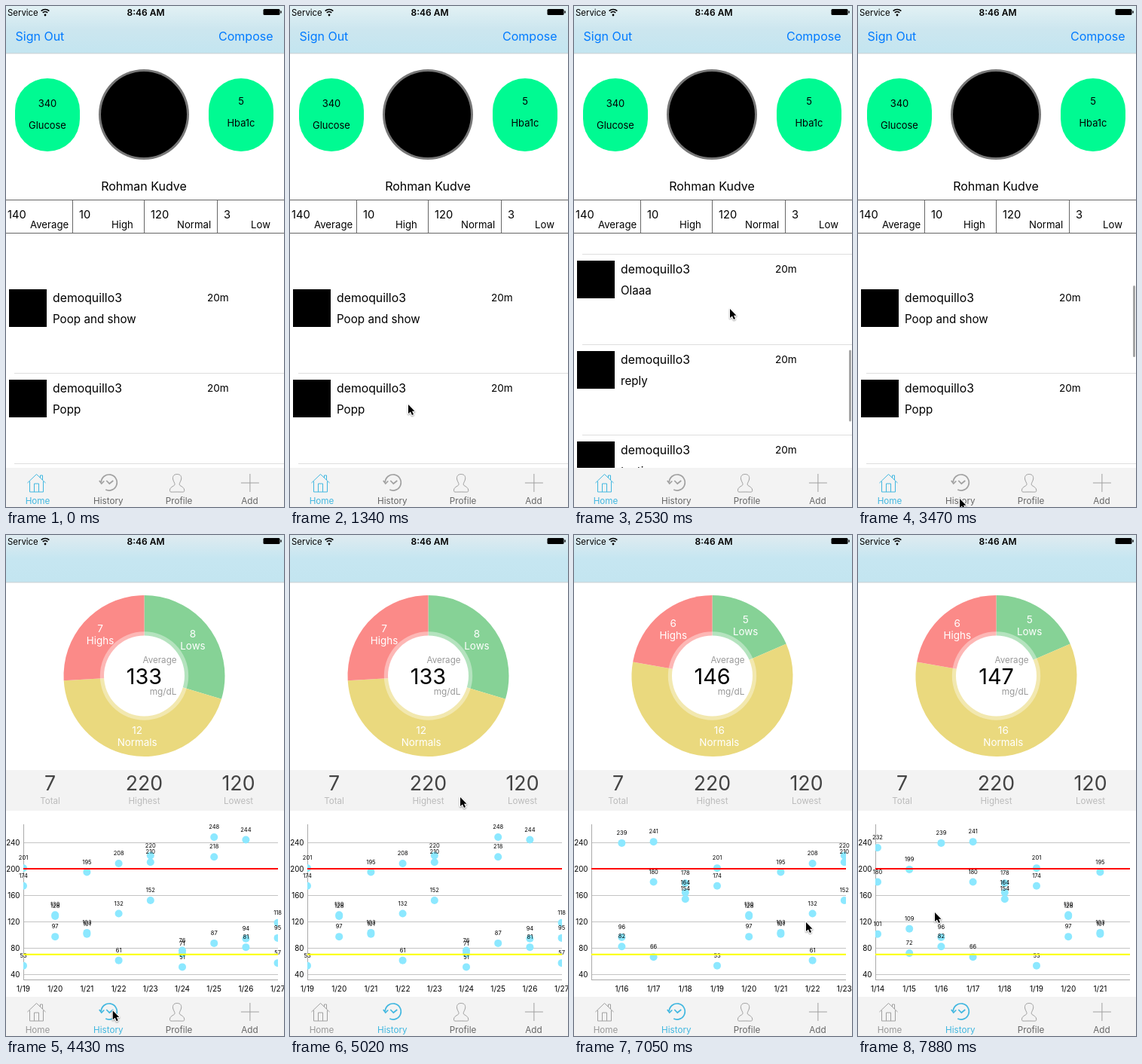
Write an HTML page with a canvas that moves like this. It is 369 px wide and 665 px high and loops after 8000 ms.

```html
<!DOCTYPE html>
<html lang="en">
<head>
<meta charset="utf-8">
<title>Glucose diary</title>
<style>
html, body { margin: 0; width: 100%; height: 100%; overflow: hidden; background: #fff; }
canvas { display: block; width: 369px; height: 665px; }
</style>
</head>
<body>
<canvas id="stage"></canvas>
<script>
const W = 369, H = 665, LOOP = 8000, TICK = 119;
const canvas = document.getElementById('stage');
const ctx = canvas.getContext('2d');
const ratio = window.devicePixelRatio || 1;
canvas.width = W * ratio;
canvas.height = H * ratio;

const BLUE = '#007aff', ACCENT = '#41b7e0', GREEN = '#00fa92', PALE = '#f3f3f3';
const POSTS = ['Poop and show', 'Popp', 'Olaaa', 'reply', 'testing', 'Hello'];

// Readings per day of January, as labelled in the chart
const FIRST_DAY = 13, TODAY = 19, DAY_WIDTH = 42.2;
const READINGS = [
  [220, 215, 70], [232, 180, 101], [199, 109, 72], [239, 96, 82], [241, 180, 66],
  [178, 164, 154], [201, 174, 53], [130, 128, 97], [195, 103, 101], [208, 132, 61],
  [220, 210, 152], [76, 71, 51], [248, 218, 87], [244, 94, 81], [118, 95, 57]
];

// Timing: progress from 0 to 1 between two times
const linear = (t, from, to) => Math.min(1, Math.max(0, (t - from) / (to - from)));
const smooth = (t, from, to) => { const f = linear(t, from, to); return f * f * (3 - 2 * f); };
const slowing = (t, from, to) => 1 - (1 - linear(t, from, to)) ** 2;

const FLICK_UP = [1333, 2047], FLICK_DOWN = [2523, 2999];
const DRAG = [6331, 7045], COAST = [7045, 7878];
const listScroll = t => 278 * (slowing(t, ...FLICK_UP) - slowing(t, ...FLICK_DOWN));
const chartScroll = t => 167 * smooth(t, ...DRAG) + 47 * slowing(t, ...COAST);

const GLIDES = [
  { from: 500, to: 1333, x: 156, y: 528 },
  { from: 1333, to: 1700, x: 168, y: 345 },
  { from: 1700, to: 2523, x: 206, y: 401 },
  { from: 2523, to: 3120, x: 134, y: 653 },
  { from: 4308, to: 5022, x: 225, y: 347 },
  { from: 5260, to: 6200, x: 123, y: 511 },
  { from: DRAG[0], to: DRAG[1], x: 307, y: 513 },
  { from: COAST[0], to: COAST[1], x: 101, y: 500 }
];

function pointerAt(t) {
  let x = 216, y = 325;
  for (const glide of GLIDES) {
    const f = smooth(t, glide.from, glide.to);
    x += (glide.x - x) * f;
    y += (glide.y - y) * f;
  }
  return [x, y];
}

// y is the middle of the capitals
function text(str, x, y, size, color = '#000', align = 'left', weight = 400) {
  ctx.font = `${weight} ${size}px Inter, sans-serif`;
  ctx.fillStyle = color;
  ctx.textAlign = align;
  ctx.fillText(str, x, y + size * 0.364);
}

function rect(x, y, w, h, color) {
  ctx.fillStyle = color;
  ctx.fillRect(x, y, w, h);
}

function pill(x, y, w, h, r, color) {
  ctx.fillStyle = color;
  ctx.beginPath();
  ctx.roundRect(x, y, w, h, r);
  ctx.fill();
}

function disc(x, y, r, color) {
  ctx.fillStyle = color;
  ctx.beginPath();
  ctx.arc(x, y, r, 0, 2 * Math.PI);
  ctx.fill();
}

function stroke(path, color, width = 1) {
  ctx.strokeStyle = color;
  ctx.lineWidth = width;
  ctx.stroke(new Path2D(path));
}

function scoped(draw) {
  ctx.save();
  draw();
  ctx.restore();
}

function clip(x, y, w, h) {
  ctx.beginPath();
  ctx.rect(x, y, w, h);
  ctx.clip();
}

function header(top, middle) {
  const fade = ctx.createLinearGradient(0, 0, 0, 62);
  [top, middle, '#c3e5f0'].forEach((color, i) => fade.addColorStop(i / 2, color));
  rect(0, 0, W, 62.5, fade);
  rect(0, 62.5, W, 0.8, '#b4c0c4');
  text('Service', 2, 8.5, 11.4);
  text('8:46 AM', 185.5, 8.5, 12, '#000', 'center', 600);
  disc(52, 12, 1.4, '#000');
  for (const r of [4.5, 7.5]) {
    ctx.beginPath();
    ctx.arc(52, 12, r, -Math.PI * 0.75, -Math.PI * 0.25);
    ctx.strokeStyle = '#000';
    ctx.lineWidth = 1.7;
    ctx.stroke();
  }
  pill(341.5, 4, 22, 8, 1.5, '#000');
  rect(364.3, 6.5, 1.4, 3, '#000');
}

const TABS = [
  ['Home', 'M0 12L12 .5L24 12M3 10V24H21V10M17 5V2H20V8M9 24V13H15V24'],
  ['History', 'M4 11A10.5 10.5 0 1 1 10 21M1.5 9L4.5 13L8 9.5M11 9L15 13L20 9'],
  ['Profile', 'M11 .5C6 .5 5 4 5.5 7S8 12 8 14S2 17 1.5 21S2 24 11 24S21 25 20.5 21S14 16 14 14S16 10 16.5 7S16 .5 11 .5Z'],
  ['Add', 'M14 0V24M2 12H26']
];

function tabBar(lit, visited) {
  rect(0, 613, W, 52, PALE);
  TABS.forEach(([label, icon], i) => {
    const x = 42 + 93.8 * i, on = lit.includes(label);
    scoped(() => {
      ctx.translate(x - 13.5, 621);
      stroke(icon, on ? ACCENT : '#a0a0a0', label === 'History' ? 1.7 : 1);
    });
    text(label, x, 656.5, 11.7, on ? ACCENT : label === visited ? '#999' : '#666', 'center');
  });
}

function badge(x, value, valueY, label) {
  pill(x - 43, 96, 86, 97, 43, GREEN);
  text(value, x, valueY, 13, '#000', 'center');
  text(label, x, valueY + 29, 12.9, '#000', 'center');
}

function postList(t) {
  const scroll = listScroll(t);
  clip(0, 302, W, 311);
  POSTS.forEach((post, i) => {
    const y = 376 + i * 120 - scroll;
    rect(4, y, 50, 50, '#000');
    text('demoquillo3', 62, y + 11, 15.8);
    text(post, 62, y + 39.5, 15.2);
    text('20m', 267, y + 11, 13.6);
    rect(11, y + 111, 358, 1, '#dedede');
  });
  if (t <= FLICK_UP[0]) return;
  ctx.globalAlpha = 1 - linear(t, 3475, 3713);
  pill(365, 371 + scroll * 0.308, 3, 95, 1.5, '#a5a5a5');
}

function home(t) {
  header('#e2f1f4', '#cce6ef');
  text('Sign Out', 12.5, 40.5, 16, BLUE);
  text('Compose', 354.5, 40.5, 16, BLUE, 'right');
  badge(55, '340', 129.5, 'Glucose');
  badge(312, '5', 126, 'Hba1c');
  disc(183, 144, 60, '#777');
  disc(183, 144, 57, '#000');
  text('Rohman Kudve', 183, 239, 16, '#000', 'center');

  stroke('M0 257.5H369M0 301.5H369M88.5 257V302M183.5 257V302M280.5 257V302', '#666');
  [['140', 2, 'Average', 32], ['10', 97, 'High', 140], ['120', 192, 'Normal', 227], ['3', 289, 'Low', 325]]
    .forEach(([value, x, label, labelX]) => {
      text(value, x, 277, 14.7);
      text(label, labelX, 290.5, 13.2);
    });
  scoped(() => postList(t));
  tabBar(t >= 4065 ? ['Home', 'History'] : ['Home']);
}

function donut(values) {
  const cx = 183.5, cy = 187, labelR = 80.4;
  const lows = values.filter(v => v < 90).length;
  const highs = values.filter(v => v > 200).length;
  const slices = [
    ['Lows', lows, '#86d296'],
    ['Normals', values.length - lows - highs, '#ead97e'],
    ['Highs', highs, '#fb8a88']
  ];
  let start = -Math.PI / 2;
  for (const [label, count, color] of slices) {
    const sweep = count / values.length * 2 * Math.PI, mid = start + sweep / 2;
    ctx.fillStyle = color;
    ctx.beginPath();
    ctx.moveTo(cx, cy);
    ctx.arc(cx, cy, 107, start, start + sweep);
    ctx.fill();
    const x = cx + labelR * Math.cos(mid), y = cy + labelR * Math.sin(mid);
    text(count, x, y - 8, 13.6, '#fff', 'center');
    text(label, x, y + 8, 13.4, '#fff', 'center');
    start += sweep;
  }
  disc(cx, cy, 58.7, 'rgba(255,255,255,.38)');
  disc(cx, cy, 53.5, '#fff');
  const mean = Math.floor(values.reduce((a, b) => a + b) / values.length);
  text('Average', 226.5, 165.5, 11.6, '#999', 'right');
  text(mean, cx, 188, 28.8, '#000', 'center');
  text('mg/dL', 226.5, 208, 11.8, '#999', 'right');
}

function chart(scroll) {
  const left = 23, right = 361, yOf = v => 618 - 0.875 * v;
  for (let v = 40; v <= 240; v += 40) {
    rect(left, yOf(v), right - left, 1, '#c4c4c4');
    text(v, 18.5, yOf(v), 9.8, '#000', 'right');
  }
  stroke('M23.5 384V591M23 590.5H361', '#aaa');

  const days = READINGS
    .map((values, i) => ({ values, day: FIRST_DAY + i }))
    .map(d => ({ ...d, x: left + (d.day - TODAY) * DAY_WIDTH + scroll }))
    .filter(d => d.x > left - 0.5 && d.x < right + 0.5);
  scoped(() => {
    clip(left, 380, right - left, 211);
    for (const { values, x } of days) values.forEach(v => disc(x, yOf(v), 5, '#8ce8ff'));
  });
  for (const { values, day, x } of days) {
    values.forEach(v => text(v, x, yOf(v) - 13.5, 7.5, '#000', 'center'));
    text('1/' + day, x, 602, 10, '#000', 'center');
  }
  rect(left, yOf(200) - 1, right - left, 2, '#f00');
  rect(left, yOf(70) - 1, right - left, 2, '#fbff00');
}

function history(t) {
  const scroll = chartScroll(t);
  const first = TODAY - FIRST_DAY - Math.ceil(scroll / DAY_WIDTH);
  header('#dfebf0', '#c6e6f1');
  donut(READINGS.slice(first, first + 9).flat());

  rect(0, 312, W, 54, PALE);
  [['7', 'Total'], ['220', 'Highest'], ['120', 'Lowest']].forEach(([value, label], i) => {
    const x = 58.5 + 125 * i;
    text(value, x, 329, 26.7, '#444', 'center');
    text(label, x, 353, 11.6, '#bbb', 'center');
  });
  chart(scroll);
  tabBar(['History'], 'Home');
}

const ARROW = new Path2D('M1 1V13L4 10.5L6 15L8 14L6 9.7H9.5Z');

function pointer(x, y) {
  ctx.translate(x, y);
  ctx.lineJoin = 'round';
  ctx.lineWidth = 2;
  ctx.strokeStyle = '#fff';
  ctx.shadowColor = 'rgba(0,0,0,.4)';
  ctx.shadowBlur = 2 * ratio;
  ctx.shadowOffsetY = ratio;
  ctx.stroke(ARROW);
  ctx.shadowColor = 'transparent';
  ctx.fillStyle = '#000';
  ctx.fill(ARROW);
}

function render() {
  // The picture advances in fixed ticks after a short rest
  const tick = Math.floor((performance.now() % LOOP - 490) / TICK);
  const t = tick < 0 ? 0 : 500 + tick * TICK;
  ctx.setTransform(ratio, 0, 0, ratio, 0, 0);
  rect(0, 0, W, H, '#fff');
  (t < 4300 ? home : history)(t);
  if (t) scoped(() => pointer(...pointerAt(t)));
  requestAnimationFrame(render);
}
requestAnimationFrame(render);
</script>
</body>
</html>
```
